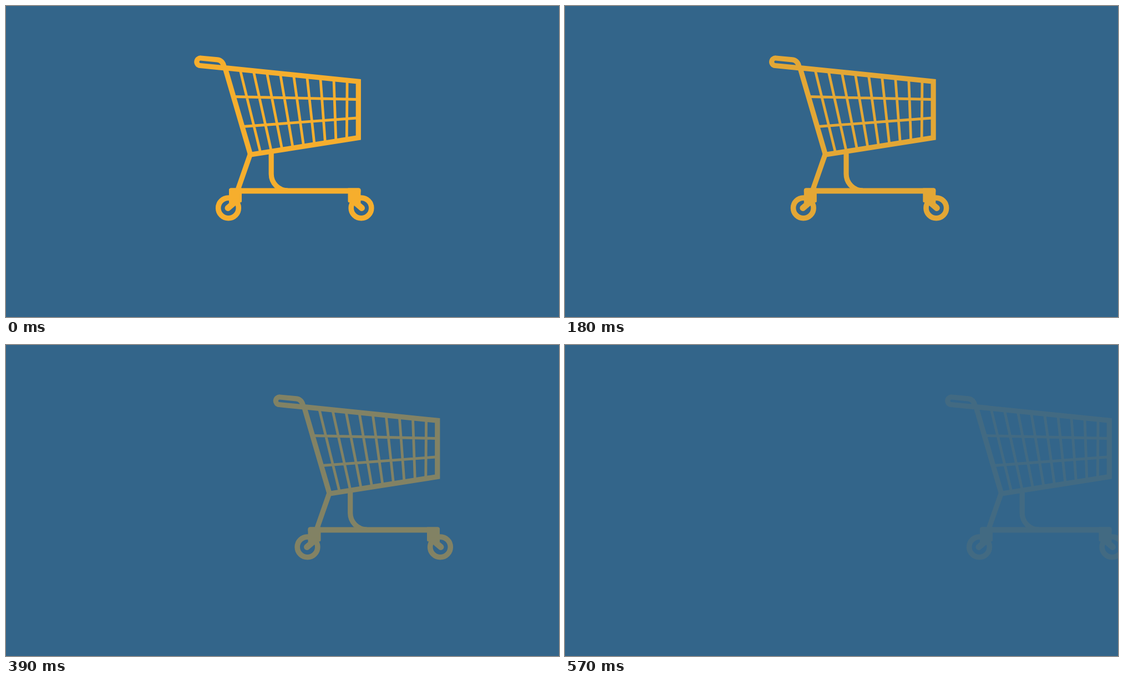
An HTML page that plays this animation: 997 by 561 pixels, repeating every 840 ms.

```html
<!DOCTYPE html>
<html lang="en">
<head>
<meta charset="utf-8">
<title>Shopping cart</title>
<style>
  html, body { margin: 0; width: 100%; height: 100%; overflow: hidden; background: #33658a; }
  svg { display: block; width: 997px; height: 561px; }
</style>
</head>
<body>
<svg viewBox="0 0 997 561">
  <g id="cart" fill="none" stroke="#f6ae2d" stroke-width="9.2">
    <!-- handle -->
    <path d="M397 112.2L349.9 107.5A6.75 6.75 0 0 1 351.3 94L381 96.9Q390.500 98 393 109"/>
    <!-- basket -->
    <path d="M395 111.600L635.300 136.200V237.600L440.700 268.200Z"/>
    <path id="grid" stroke-width="4.800"/>
    <!-- frame -->
    <path d="M440.500 267L418.500 330M478.200 264V303A30 30 0 0 0 508.200 333"/>
    <rect x="402" y="328.500" width="237.500" height="10" rx="4" fill="#f6ae2d" stroke="none"/>
    <g id="wheel">
      <circle cx="401" cy="364.400" r="18.300" stroke-width="9.600"/>
      <path d="M402 355V332.500Q402 328.500 406 328.500H425V352Q425 354.500 422 354.500Z" fill="#f6ae2d" stroke="none"/>
      <path d="M400 364.500L414 352.500" stroke-width="11" stroke-linecap="round"/>
    </g>
    <use href="#wheel" transform="translate(1041.500) scale(-1 1)"/>
  </g>
</svg>
<script>
  const LOOP = 840, STEP = 30, END = 570;
  const cart = document.getElementById('cart');

  // Nine slats and two rails
  let bars = 'M410 163.500L633 168.500M427 217.500L633 202';
  for (let i = 0; i < 9; i++) {
    bars += `M${422.3 + 24.1 * i} ${116 + 2.48 * i}L${458.7 + 19.45 * i} ${264 - 3.06 * i}`;
  }
  document.getElementById('grid').setAttribute('d', bars);

  // time, shift, opacity; the outer two only set the end slopes
  const keys = [
    [-120, 4, 0.97], [0, 0, 1], [120, 15, 0.953], [240, 49, 0.83], [300, 78, 0.7],
    [390, 142.5, 0.405], [450, 203.5, 0.243], [540, 312, 0.105], [570, 346, 0.077], [600, 379, 0.06]
  ];

  function slope(i, k) {
    const [a, b, c] = keys.slice(i - 1, i + 2);
    const before = b[0] - a[0], after = c[0] - b[0];
    return ((b[k] - a[k]) / before * after + (c[k] - b[k]) / after * before) / (before + after);
  }

  // Smooth cubic through the keys
  function valueAt(t, k) {
    let i = 1;
    while (i < keys.length - 3 && t >= keys[i + 1][0]) i++;
    const a = keys[i], b = keys[i + 1], span = b[0] - a[0];
    const u = (t - a[0]) / span, v = 1 - u;
    return v * v * (1 + 2 * u) * a[k] + u * u * (3 - 2 * u) * b[k]
      + span * u * v * (v * slope(i, k) - u * slope(i + 1, k));
  }

  function draw(now) {
    const t = Math.min(Math.floor(now % LOOP / STEP) * STEP, END);
    cart.setAttribute('transform', `translate(${valueAt(t, 1)})`);
    cart.setAttribute('opacity', valueAt(t, 2));
  }

  let start;
  function tick(now) {
    start ??= now;
    draw(now - start);
    requestAnimationFrame(tick);
  }
  draw(0);
  requestAnimationFrame(tick);
</script>
</body>
</html>
```
